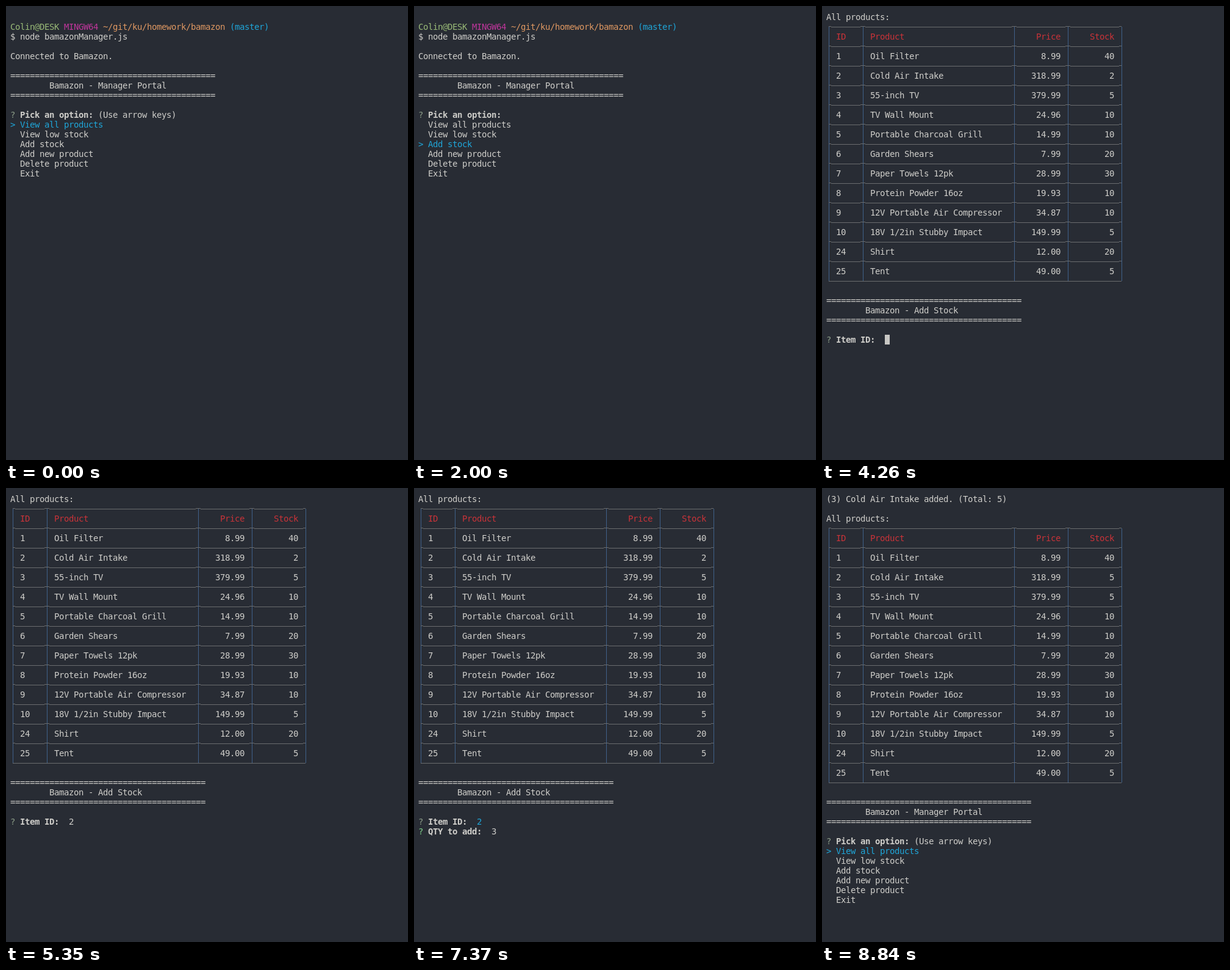
These frames come from a looping animation (659x743 px, 9.94 s). An HTML page:

```html
<!DOCTYPE html>
<html lang="en">
<head>
<meta charset="utf-8">
<title>Terminal session</title>
<style>
  html, body { margin: 0; width: 100%; height: 100%; overflow: hidden; background: #282c34; }
  svg { display: block; width: 659px; height: 743px; }
  text { font: 14px "DejaVu Sans Mono", "Noto Sans Mono", monospace; white-space: pre; }
  .bold { font-weight: 700; }
</style>
</head>
<body>
<svg id="screen" viewBox="0 0 659 743"></svg>
<script>
const LOOP = 9940;
const CELL_W = 8, CELL_H = 16, LEFT = 7, TOP = 10;
const C = {
  fg: '#cfceca', green: '#98b977', magenta: '#c0369c', orange: '#df9862',
  cyan: '#1fa6d9', red: '#c93339', dim: '#8b9c88', bright: '#7fd08a',
  line: '#6a6c6e', side: '#40618a', cursor: '#c8c7c4'
};

const screen = document.getElementById('screen');
const OPTIONS = ['View all products', 'View low stock', 'Add stock',
  'Add new product', 'Delete product', 'Exit'];
const PRODUCTS = [
  ['1', 'Oil Filter', '8.99', '40'],
  ['2', 'Cold Air Intake', '318.99', '2'],
  ['3', '55-inch TV', '379.99', '5'],
  ['4', 'TV Wall Mount', '24.96', '10'],
  ['5', 'Portable Charcoal Grill', '14.99', '10'],
  ['6', 'Garden Shears', '7.99', '20'],
  ['7', 'Paper Towels 12pk', '28.99', '30'],
  ['8', 'Protein Powder 16oz', '19.93', '10'],
  ['9', '12V Portable Air Compressor', '34.87', '10'],
  ['10', '18V 1/2in Stubby Impact', '149.99', '5'],
  ['24', 'Shirt', '12.00', '20'],
  ['25', 'Tent', '49.00', '5']
];
const BORDERS = [0, 7, 38, 49, 60];

const px = col => LEFT + col * CELL_W;
const py = row => TOP + row * CELL_H;
const rect = (x, y, w, h, fill) =>
  `<rect x="${x}" y="${y}" width="${w}" height="${h}" fill="${fill}"/>`;

// Each character sits in its own terminal cell.
function put(col, row, str, fill = C.fg, bold = false) {
  const safe = str.replace(/&/g, '&amp;').replace(/</g, '&lt;').replace(/>/g, '&gt;');
  const xs = [...str].map((_, i) => px(col + i)).join(' ');
  return `<text x="${xs}" y="${py(row) + 13}" fill="${fill}"` +
    `${bold ? ' class="bold"' : ''}>${safe}</text>`;
}

const putRight = (end, row, str, fill) => put(end - str.length, row, str, fill);
const cursor = (col, row) => rect(px(col), py(row), CELL_W, CELL_H, C.cursor);

function banner(row, title, width) {
  const rule = '='.repeat(width);
  return put(0, row, rule) + put(8, row + 1, title) + put(0, row + 2, rule);
}

function prompt(row, label, color = C.dim) {
  return put(0, row, '?', color) + put(2, row, label, C.fg, true);
}

function menu(row, selected, hint) {
  let out = prompt(row, 'Pick an option:');
  if (hint) out += put(18, row, '(Use arrow keys)');
  OPTIONS.forEach((name, i) => {
    const on = i === selected;
    if (on) out += put(0, row + 1 + i, '>', C.cyan);
    out += put(2, row + 1 + i, name, on ? C.cyan : C.fg);
  });
  return out;
}

function borderRow(row, last) {
  const y = py(row) + 8;
  const lift = last ? 0 : 1;
  let out = '';
  BORDERS.forEach((col, i) => {
    const x = px(col), end = i === BORDERS.length - 1;
    const from = i ? x : x + 4;
    out += rect(from, y - lift, i && !end ? 8 : 4, 1, C.line);
    if (!end) out += rect(x + 8, y, px(BORDERS[i + 1]) - x - 8, 1, C.line);
  });
  return out;
}

function table(row, intakeStock) {
  let out = '';
  const rows = [['ID', 'Product', 'Price', 'Stock'], ...PRODUCTS];
  const bottom = row + rows.length * 2;
  for (const col of BORDERS) {
    out += rect(px(col) + 4, py(row) + 8, 1, (bottom - row) * CELL_H, C.side);
  }
  rows.forEach(([id, name, price, stock], i) => {
    const r = row + 1 + i * 2, fill = i ? C.fg : C.red;
    out += borderRow(r - 1);
    out += put(2, r, id, fill) + put(9, r, name, fill);
    out += putRight(48, r, price, fill);
    out += putRight(59, r, i === 2 ? intakeStock : stock, fill);
  });
  return out + borderRow(bottom, true);
}

function startScreen(selected, hint) {
  return put(0, 1, 'Colin@DESK', C.green) + put(11, 1, 'MINGW64', C.magenta) +
    put(19, 1, '~/git/ku/homework/bamazon', C.orange) + put(45, 1, '(master)', C.cyan) +
    put(0, 2, '$ node bamazonManager.js') + put(0, 4, 'Connected to Bamazon.') +
    banner(6, 'Bamazon - Manager Portal', 42) + menu(10, selected, hint);
}

function stockScreen({ id = '', qty = null, blink = false }) {
  const asking = qty !== null;
  let out = put(0, 0, 'All products:') + table(1, '2') +
    banner(29, 'Bamazon - Add Stock', 40) + prompt(33, 'Item ID:') +
    put(12, 33, id, asking ? C.cyan : C.fg);
  if (asking) out += prompt(34, 'QTY to add:', C.bright) + put(15, 34, qty);
  if (blink) out += asking ? cursor(15 + qty.length, 34) : cursor(12 + id.length, 33);
  return out;
}

function doneScreen() {
  return put(0, 0, '(3) Cold Air Intake added. (Total: 5)') +
    put(0, 2, 'All products:') + table(3, '5') +
    banner(31, 'Bamazon - Manager Portal', 42) + menu(35, 0, true);
}

const STEPS = [
  [0, () => startScreen(0, true)],
  [1300, () => startScreen(1, false)],
  [2000, () => startScreen(2, false)],
  [3100, () => stockScreen({ blink: true })],
  [3630, () => stockScreen({})],
  [4260, () => stockScreen({ blink: true })],
  [4810, () => stockScreen({ id: '2', blink: true })],
  [5350, () => stockScreen({ id: '2' })],
  [5730, () => stockScreen({ id: '2', qty: '', blink: true })],
  [6360, () => stockScreen({ id: '2', qty: '' })],
  [6740, () => stockScreen({ id: '2', qty: '3', blink: true })],
  [7370, () => stockScreen({ id: '2', qty: '3' })],
  [7750, doneScreen]
];

let shown = -1;
function update(time) {
  const t = time % LOOP;
  let step = STEPS.length - 1;
  while (t < STEPS[step][0]) step--;
  if (step === shown) return;
  shown = step;
  screen.innerHTML = STEPS[step][1]();
}

const start = performance.now();
function frame() {
  update(performance.now() - start);
  requestAnimationFrame(frame);
}
frame();
</script>
</body>
</html>
```
